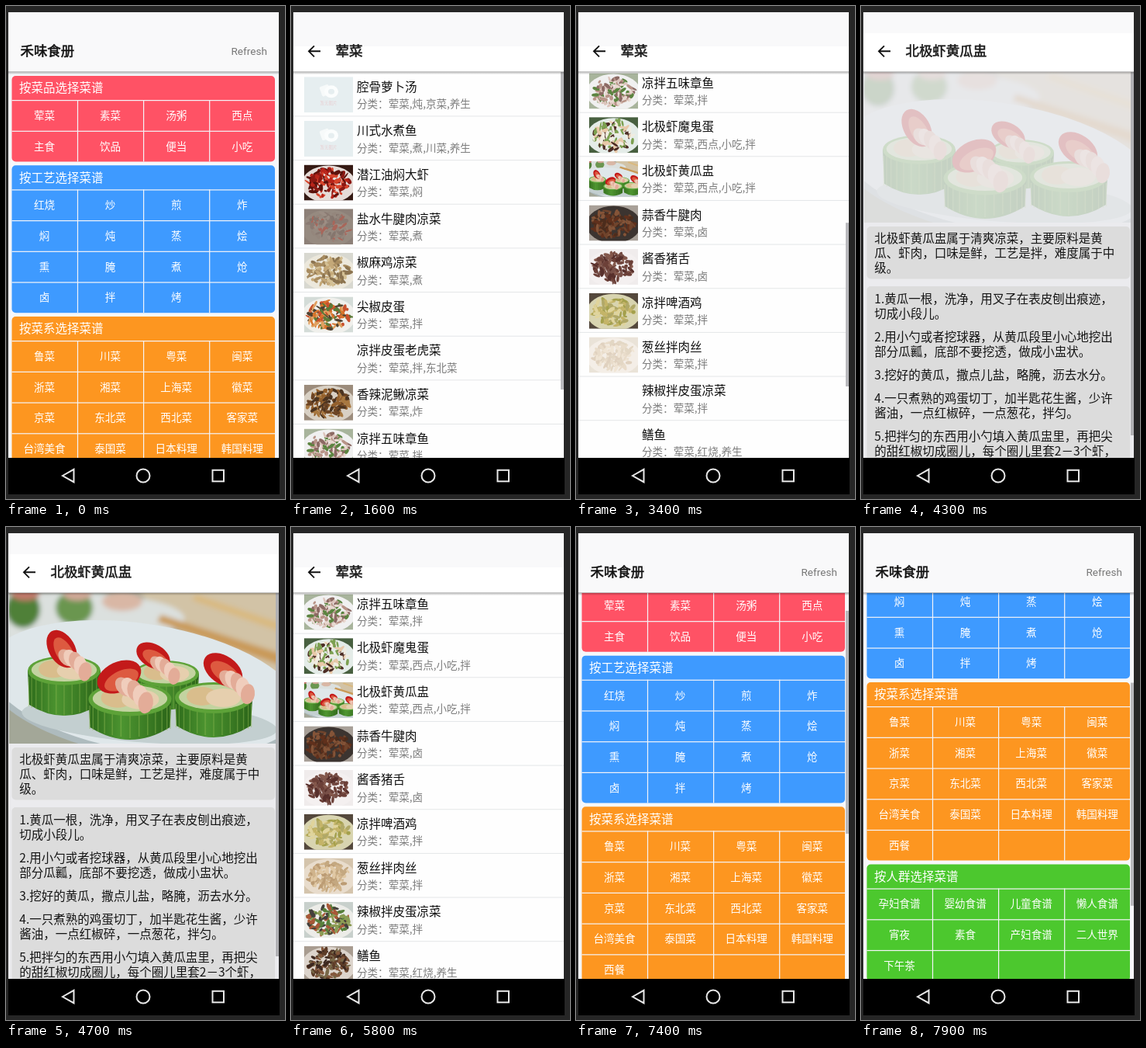
Recreate the animation shown at these times as an HTML page. Size 360 px wide and 635 px high, loop 8 s.

```html
<!DOCTYPE html>
<html lang="zh-CN">
<head>
<meta charset="utf-8">
<style>
html, body { margin: 0; width: 100%; height: 100%; overflow: hidden; background: #262626; }
svg { display: block; }
text { font-family: 'Noto Sans CJK SC', 'Noto Sans CJK', sans-serif; white-space: pre; }
.mid { text-anchor: middle; }
.bold { stroke: #1c1c1c; stroke-width: .6; }
.latin { font-family: Roboto, sans-serif; }
</style>
</head>
<body>
<svg id="stage" width="360" height="635" viewBox="0 0 360 635"></svg>
<script>
const SMALL = 13.57, BODY = 15.51, TITLE = 17.45;
const ROW = 56.65, VIEW = 497, TOP = 85;

const rect = (x, y, w, h, fill, extra = '') =>
  `<rect x="${x}" y="${y}" width="${w}" height="${h}" fill="${fill}" ${extra}/>`;
const oval = (x, y, rx, ry, fill, turn = 0) =>
  `<ellipse cx="${x}" cy="${y}" rx="${rx}" ry="${ry}" fill="${fill}" transform="rotate(${turn} ${x} ${y})"/>`;
const path = (d, fill, extra = '') => `<path d="${d}" fill="${fill}" ${extra}/>`;
// y is the middle of the line
const text = (s, x, y, size, fill, cls = '') =>
  `<text x="${x}" y="${y + size * .34}" font-size="${size}" fill="${fill}" class="${cls}">${s}</text>`;
const group = (id, body, extra = '') => `<g id="${id}" ${extra}>${body}</g>`;

function random(seed) {
  return () => (seed = (seed * 16807) % 2147483647) / 2147483647;
}

// Home: coloured category cards
const cards = [
  ['按菜品选择菜谱', '#ff5265', 2, '荤菜 素菜 汤粥 西点 主食 饮品 便当 小吃'],
  ['按工艺选择菜谱', '#3e9aff', 4, '红烧 炒 煎 炸 焖 炖 蒸 烩 熏 腌 煮 炝 卤 拌 烤'],
  ['按菜系选择菜谱', '#fd9620', 5, '鲁菜 川菜 粤菜 闽菜 浙菜 湘菜 上海菜 徽菜 京菜 东北菜 西北菜 客家菜 台湾美食 泰国菜 日本料理 韩国料理 西餐'],
  ['按人群选择菜谱', '#4cc82e', 3, '孕妇食谱 婴幼食谱 儿童食谱 懒人食谱 宵夜 素食 产妇食谱 二人世界 下午茶']
];

function homePage() {
  const cell = 39.72, head = 31, col = 85.1;
  let y = 90, out = '';
  for (const [name, color, rows, items] of cards) {
    const h = head + rows * cell;
    out += rect(7.5, y, 339.5, h, color, 'rx="5"') + text(name, 17, y + 16, BODY, '#fff');
    for (let r = 0; r < rows; r++) out += rect(7.5, y + head + r * cell, 339.5, 1.2, '#f4f4f8');
    for (let c = 1; c < 4; c++) out += rect(6.8 + c * col, y + head, 1.2, h - head, '#f4f4f8');
    items.split(' ').forEach((s, i) => {
      out += text(s, 49.5 + i % 4 * col, y + head + (i >> 2) * cell + 20.3, SMALL, '#fff', 'mid');
    });
    y += h + 4.85;
  }
  return out;
}

// Dish photo: cucumber cups on a plate
function cup(x, y, w, h, px, py, turn) {
  const r = w / 2, k = w * .2;
  let out = path(`M${x - r} ${y}L${x - r + 2} ${y + h}Q${x} ${y + h + k * 1.5} ${x + r - 2} ${y + h}L${x + r} ${y}Z`, 'url(#peel)');
  for (let i = -6; i < 7; i++) {
    const sx = x + r * Math.sin(i * .22);
    out += path(`M${sx} ${y + 8}v${h + 6 - Math.abs(i) * 2}`, 'none', `stroke="#8fb852" stroke-opacity=".45" stroke-width="${w * .014}"`);
  }
  out += oval(x, y, r, k, '#5da238') + oval(x, y - 1, r * .9, k * .8, '#c3d3a0');
  out += oval(x - r * .3, y - 2, r * .4, k * .6, '#d9bd8c') + oval(x + r * .25, y, r * .45, k * .6, '#e6cfae');
  out += oval(px, py, w * .28, w * .18, '#c31a1a', turn) + oval(px + 3, py + 4, w * .22, w * .11, '#dd5a40', turn);
  for (let i = 0; i < 5; i++) {
    out += oval(px + w * (.06 + i * .065), py + w * (.12 + i * i * .012), w * .13, w * .09, i % 2 ? '#f0cdbc' : '#e3ac98', 50 + i * 12);
  }
  return out;
}

const cups =
  '<g filter="url(#soft)">' +
  rect(-20, 65, 390, 234, '#a3a798') +
  path('M150 60H380V220L215 130Z', '#d2c3a6') +
  oval(75, 118, 155, 34, '#dbe0de') +
  oval(22, 106, 22, 24, '#4f8038') + oval(88, 104, 24, 22, '#6b9650') +
  oval(25, 87, 18, 8, '#c0796a') + oval(92, 87, 18, 8, '#d0a898') + oval(150, 96, 26, 12, '#d9b7a5') +
  path('M200 113L360 165V180L195 122Z', '#c99a58') +
  path('M245 87L360 126V137L240 94Z', '#d9b980') +
  '</g>' +
  oval(175, 212, 205, 84, '#aebbbe', 9) + oval(178, 207, 203, 82, '#dfe7ea', 9) +
  oval(185, 250, 165, 28, '#c3cfd0', 4) +
  cup(207, 189, 84, 34, 190, 166, 30) +
  cup(75, 185, 94, 44, 72, 157, 60) +
  cup(160, 222, 107, 36, 146, 193, -25) +
  cup(268, 220, 100, 36, 280, 184, 35);

// Dishes: name, tags, photo tones (ground, plate, food...)
const dishes = [
  ['腔骨萝卜汤', '炖,京菜,养生'],
  ['川式水煮鱼', '煮,川菜,养生'],
  ['潜江油焖大虾', '焖', '351a14 e6dcd8 b8241a 8c1812 d8452c 5a120c'],
  ['盐水牛腱肉凉菜', '煮', '8d8078 968a80 8a7a72 9c8e84 94867c 85766e a8665a'],
  ['椒麻鸡凉菜', '煮', 'd8d8d0 ece8dc c4a878 8c7450 d4c094 a88c60'],
  ['尖椒皮蛋', '拌', 'd4dcd8 f0f0ec d8742c 5c7a38 4e4030 c8502c e0a060'],
  ['凉拌皮蛋老虎菜', '拌,东北菜', 'c4ccc4 e4e8e4 3c6a34 b85c30 38403c 7c9a48'],
  ['香辣泥鳅凉菜', '炸', '9c8c7c d8d0c4 6c4424 4c3420 94602c a87840'],
  ['凉拌五味章鱼', '拌', 'a8b49c f0f0f0 b89488 8c6a64 dcc4bc e8d8d0 5c8440'],
  ['北极虾魔鬼蛋', '西点,小吃,拌', '486040 e4ece8 f0ece0 7ca050 4c2c24 e8c8a8'],
  ['北极虾黄瓜盅', '西点,小吃,拌', 'cups'],
  ['蒜香牛腱肉', '卤', 'a8a098 3c3430 70442c 4c2c1c 845438 60301c'],
  ['酱香猪舌', '卤', 'f0ecec f4f0f0 6c4038 84584c 58302c 785048'],
  ['凉拌啤酒鸡', '拌', '54483c d8d4b0 c4b468 a4a04c e0d49c b0a868'],
  ['葱丝拌肉丝', '拌', 'd4c4ac e8dccc d0b48c bc9c74 e0c8a4 c4a880'],
  ['辣椒拌皮蛋凉菜', '拌', 'c8d0cc ecece8 58803c 44403c a85838 8c9c54'],
  ['鳝鱼', '红烧,养生', 'a89c90 dcd4cc 5c3c28 3c2820 84583c 786848']
];

function thumb(tones, seed) {
  if (!tones) {
    return rect(0, 0, 63, 46, '#e6eef0') +
      rect(21, 11, 12, 13, '#f7fafa', 'rx="2" transform="rotate(-20 27 17)"') +
      oval(35, 19, 9, 8, '#fbfdfd') + oval(35, 19, 4, 3.5, '#e6eef0') +
      text('暂无图片', 31.5, 34, 5.5, '#e8cfd2', 'mid');
  }
  if (tones === 'cups') {
    return `<svg width="63" height="46" viewBox="30 85 266 194">${cups}</svg>`;
  }
  const [ground, plate, ...food] = tones.split(' ').map(c => '#' + c);
  const rnd = random(seed * 7919 + 11);
  let out = rect(0, 0, 63, 46, ground) + oval(31.5, 25, 35, 24, plate);
  for (let i = 0; i < 110; i++) {
    const a = rnd() * 6.28, d = Math.sqrt(rnd());
    out += oval(31.5 + Math.cos(a) * d * 27, 23.5 + Math.sin(a) * d * 18,
      2 + rnd() * 4, 1 + rnd() * 1.6, food[i % food.length], rnd() * 180);
  }
  return out;
}

function listPage() {
  return dishes.map(([name, tags, tones], i) => {
    const y = 85.3 + i * ROW;
    return group('pic' + i, `<svg x="17" y="${y + 6}" width="63" height="46">${thumb(tones, i + 1)}</svg>`) +
      text(name, 85, y + 19, BODY, '#111') +
      text('分类：荤菜,' + tags, 85, y + 41, SMALL, '#7c7c7c') +
      rect(3, y + ROW - .5, 349, 1, '#e4e6e8');
  }).join('');
}

const intro = ['北极虾黄瓜盅属于清爽凉菜，主要原料是黄', '瓜、虾肉，口味是鲜，工艺是拌，难度属于中', '级。'];
const steps = [
  ['1.黄瓜一根，洗净，用叉子在表皮刨出痕迹，', '切成小段儿。'],
  ['2.用小勺或者挖球器，从黄瓜段里小心地挖出', '部分瓜瓤，底部不要挖透，做成小盅状。'],
  ['3.挖好的黄瓜，撒点儿盐，略腌，沥去水分。'],
  ['4.一只煮熟的鸡蛋切丁，加半匙花生酱，少许', '酱油，一点红椒碎，一点葱花，拌匀。'],
  ['5.把拌匀的东西用小勺填入黄瓜盅里，再把尖', '的甜红椒切成圈儿，每个圈儿里套2－3个虾，']
];

function detailPage() {
  const lines = (list, y) => list.map((s, i) => text(s, 17.3, y + i * 18.7, BODY, '#151515')).join('');
  let y = 378, out = group('photo', `<svg x="4" y="85" width="345" height="194" viewBox="4 85 345 194">${cups}</svg>`);
  out += rect(7.5, 284, 339.5, 67.5, '#dcdcdc', 'rx="5"') + lines(intro, 300);
  out += rect(7.5, 361, 339.5, 240, '#dcdcdc', 'rx="5"');
  for (const s of steps) {
    out += lines(s, y);
    y += s.length * 18.6 + 11.6;
  }
  return out + rect(348, 85, 4, 468, '#b0b0b3');
}

const paper = color => rect(3, 85, 349, 497, color);
const bar = id => rect(348, 85, 4, 10, '#b8b8bc', `id="${id}"`);

document.getElementById('stage').innerHTML =
  `<defs><clipPath id="body"><rect x="3" y="85" width="349" height="497"/></clipPath>
  <linearGradient id="shade" x2="0" y2="1"><stop stop-color="#000" stop-opacity=".32"/><stop offset="1" stop-color="#000" stop-opacity="0"/></linearGradient>
  <linearGradient id="peel"><stop stop-color="#2c6a1a"/><stop offset=".4" stop-color="#4c9430"/><stop offset="1" stop-color="#2a6418"/></linearGradient>
  <filter id="soft"><feGaussianBlur stdDeviation="3"/></filter></defs>` +
  rect(0, 0, 360, 635, '#262626') +
  '<g clip-path="url(#body)">' +
  paper('#f6f7fa') + group('homeRows', homePage()) + bar('homeBar') +
  group('list', paper('#fefefe') + group('listRows', listPage()) + bar('listBar')) +
  group('detail', paper('#ebebee') + detailPage()) + '</g>' +
  rect(3, 8, 349, 77, '#f9f9fa') +
  group('listHead', rect(3, 52, 349, 33, '#fff') + text('荤菜', 57.5, 58, TITLE, '#1c1c1c', 'bold')) +
  group('detailHead', rect(3, 35, 349, 50, '#fff') + text('北极虾黄瓜盅', 57.5, 58, TITLE, '#1c1c1c', 'bold')) +
  group('homeHead', text('禾味食册', 18.5, 58, TITLE, '#0c0c0c', 'bold') + text('Refresh', 290.5, 58.6, SMALL, '#777', 'latin')) +
  path('M38 58.3H23.5M30 51.3L23 58.3L30 65.3', 'none', 'id="back" stroke="#111" stroke-width="1.9"') +
  rect(3, 84.3, 349, 4, 'url(#shade)') +
  rect(3, 582, 350, 47, '#000') +
  '<g fill="none" stroke="#e8e8e8" stroke-width="2"><path d="M73 605L87.5 596.8V613.2Z"/><circle cx="177" cy="605" r="8.5"/><rect x="266.5" y="597.8" width="14.5" height="14.5"/></g>';

const el = id => document.getElementById(id);
const ramp = (t, a, b) => Math.min(1, Math.max(0, (t - a) / (b - a)));
const smooth = u => u * u * (3 - 2 * u);
const fade = (id, v) => el(id).setAttribute('opacity', v);
const shift = (id, y) => el(id).setAttribute('transform', `translate(0 ${y})`);

function scrollbar(id, scroll, content, opacity) {
  el(id).setAttribute('y', TOP + scroll * VIEW / content);
  el(id).setAttribute('height', VIEW * VIEW / content);
  fade(id, opacity);
}

function draw(now) {
  const t = Math.floor(now % 8000 / 100) * 100;
  const list = smooth(ramp(t, 1350, 1600)) - smooth(ramp(t, 6060, 6400));
  const detail = smooth(ramp(t, 3950, 4300)) - smooth(ramp(t, 5560, 5800));

  fade('list', list);
  shift('list', 50 * (1 - list));
  fade('detail', detail);
  shift('detail', 50 * (1 - detail));
  fade('homeHead', 1 - list);
  fade('back', list);
  fade('listHead', list * (1 - detail));
  fade('detailHead', detail);
  fade('photo', ramp(t, 4200, 4700));

  const drag = ramp(t, 2400, 2900), fling = ramp(t, 2900, 3400);
  const scroll = 117 * drag * drag + 341 * fling * (2 - fling);
  shift('listRows', -scroll);
  if (t < 2500) scrollbar('listBar', 0, 604, 1 - ramp(t, 1700, 2100));
  else scrollbar('listBar', scroll, 1172, 1 - ramp(t, 3400, 3800));

  fade('pic6', ramp(t, 1600, 2000));
  fade('pic14', .45 + .55 * ramp(t, 3400, 3700));
  fade('pic15', ramp(t, 3400, 3800));
  fade('pic16', ramp(t, 3400, 3800));

  const home = 200 * smooth(ramp(t, 7200, 7900));
  shift('homeRows', -home);
  scrollbar('homeBar', home, 860, t < 7300 ? 0 : 1);
  requestAnimationFrame(draw);
}
requestAnimationFrame(draw);
</script>
</body>
</html>
```
